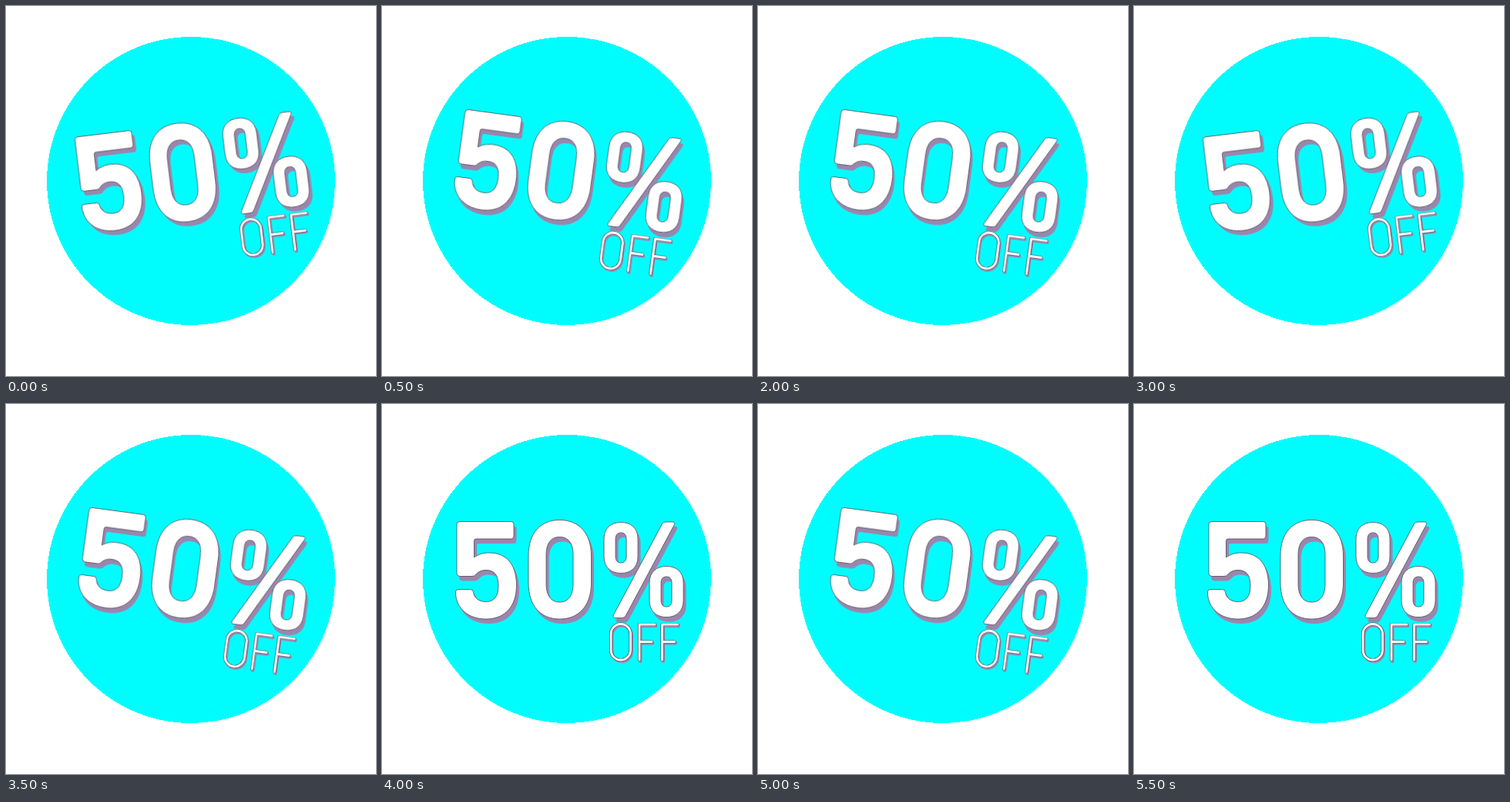
These frames come from a looping animation (480x480 px, 6000 ms). An HTML page:

```html
<!DOCTYPE html>
<html lang="en">
<head>
<meta charset="utf-8">
<title>50% OFF</title>
<style>
  html, body { margin: 0; width: 100%; height: 100%; overflow: hidden; background: #fff; }
  svg { display: block; width: 100vw; height: 100vh; }
  #label { transform-origin: 240px 227px; }
  .disc { fill: #00fdfd; shape-rendering: crispEdges; }
  .shade { fill: #9a86ad; }
  .face { fill: #fff; stroke: #4d4a55; stroke-width: 0.8; }
  .thin { fill: none; stroke-linecap: round; stroke-linejoin: round; }
  .thin .drop { stroke: #9a86ad; stroke-width: 4; }
  .thin .edge { stroke: #4d4a55; stroke-width: 4.2; }
  .thin .core { stroke: #fff; stroke-width: 2.8; }
</style>
</head>
<body>
<svg viewBox="0 0 480 480" role="img" aria-label="50% OFF">
  <defs>
    <g id="bold" fill-rule="evenodd">
      <path d="M101 152.5H167.5Q171 152.5 171 156V171.500Q171 175 167.500 175H122Q119.500 175 119.500 177.500V199
        C125 195 131 193 139 193C163 193 174.500 210 174.500 235C174.500 263 159 279 135 279
        C111 279 95.500 264 95.500 244Q95.500 240.500 99 240.500H114.500Q118 240.500 118.500 244
        C119.500 252 126 256.500 135 256.500C146 256.500 151 249 151 236C151 222 146 215.500 135 215.500
        C128 215.500 124.500 218 122 221Q120 223.500 117 223.500H101Q97 223.500 97 219.500V156.500Q97 152.500 101 152.500Z"/>
      <path d="M190 197C190 167 206 150.500 230.500 150.500C255 150.500 271.500 167 271.500 197V232
        C271.500 262 255 279 230.500 279C206 279 190 262 190 232Z
        M213 196V233C213 249 219.500 257 230.500 257C241.500 257 248 249 248 233V196C248 180 241.500 172.500 230.500 172.500C219.500 172.500 213 180 213 196Z"/>
      <path id="ring" d="M288 175C288 161 297 153.500 310 153.500C323 153.500 332 161 332 175V198
        C332 212 323 219.500 310 219.500C297 219.500 288 212 288 198Z
        M303 175V198C303 203 305.500 206 310 206C314.500 206 317 203 317 198V175C317 170 314.500 167 310 167C305.500 167 303 170 303 175Z"/>
      <use href="#ring" x="59" y="57"/>
      <path d="M368 153H377Q381 153 379 157L316 275Q314.500 277.500 311 277.500H302.500Q298.500 277.500 300.500 273.500L363.500 155.500Q365 153 368 153Z"/>
    </g>
    <g id="light">
      <rect x="297" y="285.500" width="25.500" height="46.500" rx="12.500" ry="13"/>
      <path id="eff" d="M354 286H334V332M334 308.500H350"/>
      <use href="#eff" x="29.500"/>
    </g>
  </defs>
  <circle class="disc" cx="240" cy="227" r="187"/>
  <g id="label">
    <use class="shade" href="#bold" x="3.500" y="6"/>
    <use class="face" href="#bold"/>
    <g class="thin">
      <use class="drop" href="#light" x="1.500" y="2"/>
      <use class="edge" href="#light"/>
      <use class="core" href="#light"/>
    </g>
  </g>
</svg>
<script>
  const tilts = [-6.9, 7.7, 0];
  const frames = [...tilts, tilts[0]].map((deg, i) => ({
    transform: `rotate(${deg}deg)`,
    offset: i / tilts.length,
    easing: 'step-end'
  }));
  document.getElementById('label').animate(frames, {
    duration: 500 * tilts.length,
    iterations: Infinity
  });
</script>
</body>
</html>
```
